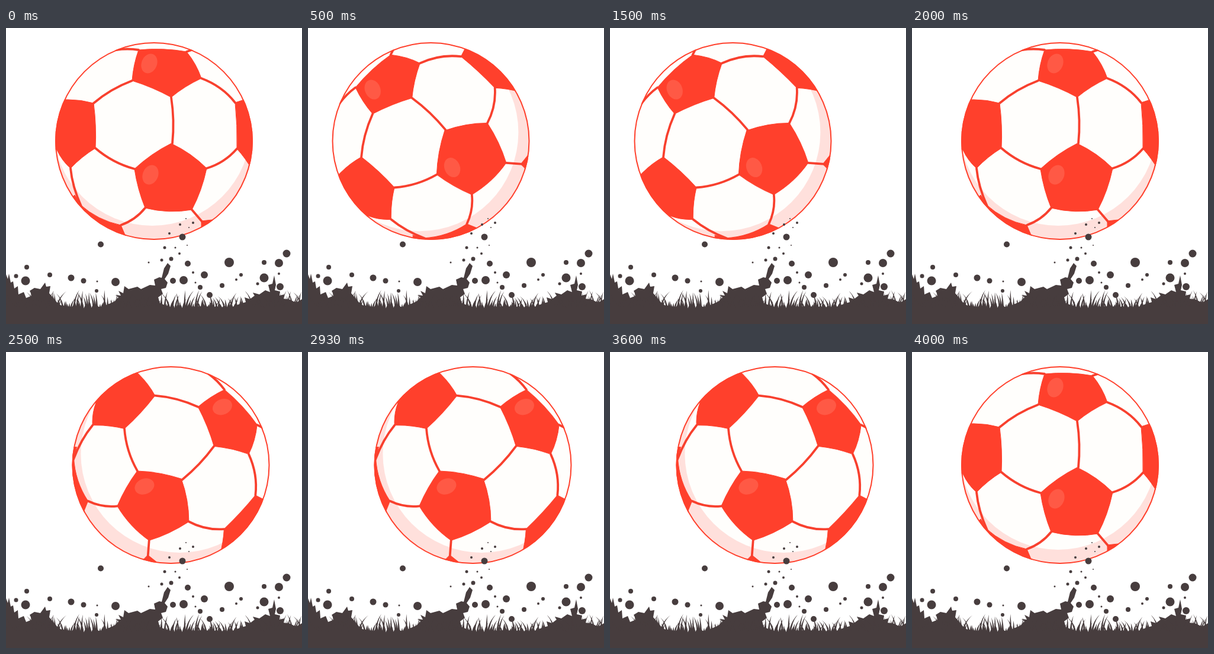
Write an HTML page that moves like this. It is 500 px wide and 500 px high and loops after 5010 ms.

```html
<!DOCTYPE html>
<html lang="en">
<head>
<meta charset="utf-8">
<title>Rolling football</title>
<style>
  html, body { margin: 0; width: 100%; height: 100%; overflow: hidden; background: #fff; }
  svg { display: block; width: 100%; height: 100%; }
</style>
</head>
<body>
<svg viewBox="0 0 500 500">
  <defs>
    <clipPath id="round"><circle cx="250" cy="191" r="167"/></clipPath>
  </defs>

  <g id="ball">
    <g clip-path="url(#round)">
      <circle cx="250" cy="191" r="167" fill="#ffe0dc"/>
      <circle cx="247" cy="167" r="167" fill="#fffefc"/>
      <!-- patches -->
      <g fill="#ff402c" stroke="#ff402c" stroke-linejoin="round">
        <path d="M224,37Q265,33 305,40Q322,61 330,85Q302,98 279,117Q248,100 213,89Q215,62 224,37Z"/>
        <path d="M279,195Q313,211 339,237Q331,275 314,307Q275,314 235,304Q222,272 217,238Q245,212 279,195Z"/>
        <path d="M148,127Q127,121 105,121L80,121L70,200L86,206Q95,225 109,237Q128,217 151,203Q153,165 148,127Z"/>
        <path d="M387,126L412,118L440,180L418,243Q404,219 390,204Q391,164 387,126Z"/>
        <path d="M116,282L125,298Q155,325 194,333L203,354L150,370L100,300Z"/>
        <path d="M330,326L348,324L352,332L330,344Z"/>
      </g>
      <!-- seams -->
      <path fill="none" stroke="#f8402e" stroke-width="3.8" stroke-linecap="round" d="
        M279,117Q285,156 281,195M148,127Q176,103 213,89M151,203Q180,228 217,238
        M330,85Q365,98 387,126M339,237Q369,228 390,204M109,237Q112,268 127,301
        M235,304Q219,324 194,333M314,307L332,328M224,37Q205,34 186,37M305,40L320,35"/>
      <g fill="#ff5945">
        <ellipse cx="242" cy="60" rx="13" ry="17" transform="rotate(22 242 60)"/>
        <ellipse cx="244" cy="248" rx="13" ry="17" transform="rotate(22 244 248)"/>
      </g>
    </g>
    <circle cx="250" cy="191" r="166" fill="none" stroke="#ff402c" stroke-width="2"/>
  </g>

  <g fill="#473d3e">
    <path d="M0,500V416L3,424L5,415L8,430L12,428L14,440L20,436L21,450L30,446L34,456L44,452
      L40,444L48,439L58,441L66,430L68,437L75,436L73,448L79,455L90,468L130,474L165,470L183,462
      L190,455L185,451L194,452L190,444L198,448L200,436L207,441L222,437L228,441L243,434L252,435
      L250,425L259,421L263,422L267,406L273,397L278,402L274,415L268,424L273,430L270,439L262,441
      L265,449L257,455L260,465L285,474L330,470L380,472L395,466L405,463L403,455L412,458L420,452
      L417,447L428,450L438,443L446,446L443,434L450,432L453,418L456,434L454,443L463,445L462,452
      L470,450L468,457L480,459L490,464L500,458V500Z"/>
    <path id="grass"/>
    <g id="drops"></g>
  </g>
</svg>

<script>
const $ = id => document.getElementById(id);

// Paint drops: x, y, radius
const drops = `160 365.5 5,35 404 4,17 419 3.5,33 427 7.5,74 417 4,110 422 5.5,131 427 4.5,154 428 1.5,
153 444 3,185 429 7,298 353 5.5,294 332 2,316 329 2,304 322 1,309 337 1,276 347 2,268 371 2.5,
286 371 1.5,293 381 2,306 367 1,263 392 2.5,279 390 3.5,241 396 1.5,307 398 5,335 417 6,316 413 2,
282 427 5,300 426 7,328 438 4,320 430 1.5,344 451 5,365 435 4,377 396 8,389 425 2,397 417 3,
425 432 2.5,436 396 4,436 422 7.5,461 397 7,474 381 6.5,461 415 2,463 437 6`;
$('drops').innerHTML = drops.split(',').map(drop => {
  const [x, y, r] = drop.trim().split(' ');
  return `<circle cx="${x}" cy="${y}" r="${r}"/>`;
}).join('');

let seed = 11;
const random = () => (seed = seed * 16807 % 2147483647) / 2147483647;

let blades = '';
for (let x = 0; x < 500; x += 2.6) {
  const height = 8 + 24 * random() ** 1.6;
  const lean = (random() - 0.5) * height * 1.1;
  const tip = `${x + lean},${474 - height}`;
  const bend = 474 - height * 0.55;
  blades += `M${x - 2},478Q${x - 1},${bend} ${tip}Q${x + 1.4},${bend} ${x + 2},478Z`;
}
$('grass').setAttribute('d', blades);

// Eighth turns of the ball, one pose every half second
const turns = [0, -1, -2, -1, 0, 1, 2, 1, 0];

function draw(now) {
  const step = Math.min(Math.floor(now % 5010 / 500), 8);
  const turn = turns[step];
  const x = 250 + 42.5 * turn - (turn > 0 ? 14 : 0);
  $('ball').setAttribute('transform', `translate(${x} 191) rotate(${turn * 45}) translate(-250 -191)`);
  requestAnimationFrame(draw);
}
const start = performance.now();
requestAnimationFrame(function frame() {
  draw(Math.max(0, performance.now() - start));
});
</script>
</body>
</html>
```
